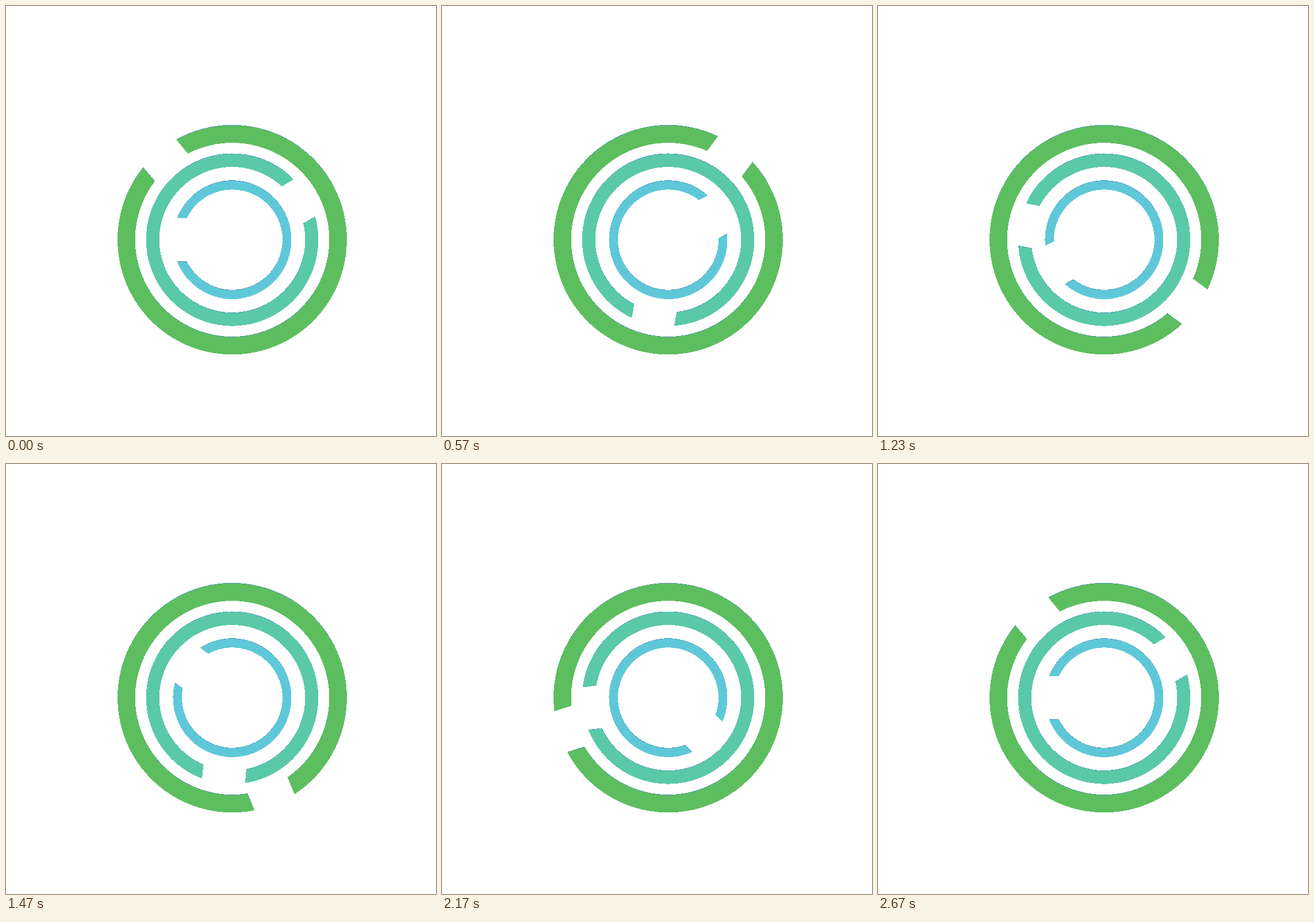
An HTML page that plays this animation: 748 by 748 pixels, repeating every 2730 ms.

```html
<!DOCTYPE html>
<html lang="en">
<head>
<meta charset="utf-8">
<title>Rotating rings</title>
<style>
  html, body { margin: 0; width: 100%; height: 100%; overflow: hidden; background: #fff; }
  svg { display: block; width: 748px; height: 748px; }
</style>
</head>
<body>
<svg id="stage" viewBox="0 0 748 748" shape-rendering="crispEdges"></svg>
<script>
const LOOP = 2730, STEPS = 80, STEP_MS = 100 / 3;
const CENTER = [393.5, 406.9], HALF_GAP = 37.6, RIM = '#4a8db4', RIM_LIFT = 0.7;

// start: gap direction in degrees clockwise from the top; turns: per loop
const rings = [
  { outer: 199.4, inner: 168.9, color: '#5dbe5f', start: -40, turns: 1 },
  { outer: 149.7, inner: 126.9, color: '#5ac9a8', start: 60, turns: -3 },
  { outer: 103, inner: 87.6, color: '#5fc8d8', start: -90, turns: 2 },
];

const stage = document.getElementById('stage');

function add(parent, tag, attributes) {
  const node = document.createElementNS('http://www.w3.org/2000/svg', tag);
  for (const name in attributes) node.setAttribute(name, attributes[name]);
  return parent.appendChild(node);
}

// Ring cut by a straight slot of constant width, pointing up
function ringPath({ outer, inner }) {
  const top = r => -Math.sqrt(r * r - HALF_GAP * HALF_GAP);
  return `M${HALF_GAP} ${top(outer)}A${outer} ${outer} 0 1 1 ${-HALF_GAP} ${top(outer)}` +
    `L${-HALF_GAP} ${top(inner)}A${inner} ${inner} 0 1 0 ${HALF_GAP} ${top(inner)}Z`;
}

function layer(ring, fill, lift) {
  const group = add(stage, 'g', { transform: `translate(${CENTER[0]} ${CENTER[1] - lift})` });
  return add(group, 'path', { d: ringPath(ring), fill });
}

for (const ring of rings) {
  ring.layers = [layer(ring, RIM, RIM_LIFT), layer(ring, ring.color, 0)];
}

function draw(now) {
  const step = Math.min(STEPS, Math.floor((now % LOOP + 5) / STEP_MS));
  for (const { layers, start, turns } of rings) {
    const angle = start + 360 * turns * step / STEPS;
    for (const path of layers) path.setAttribute('transform', `rotate(${angle})`);
  }
}

const begin = performance.now();
function tick() {
  draw(performance.now() - begin);
  requestAnimationFrame(tick);
}
tick();
</script>
</body>
</html>
```
